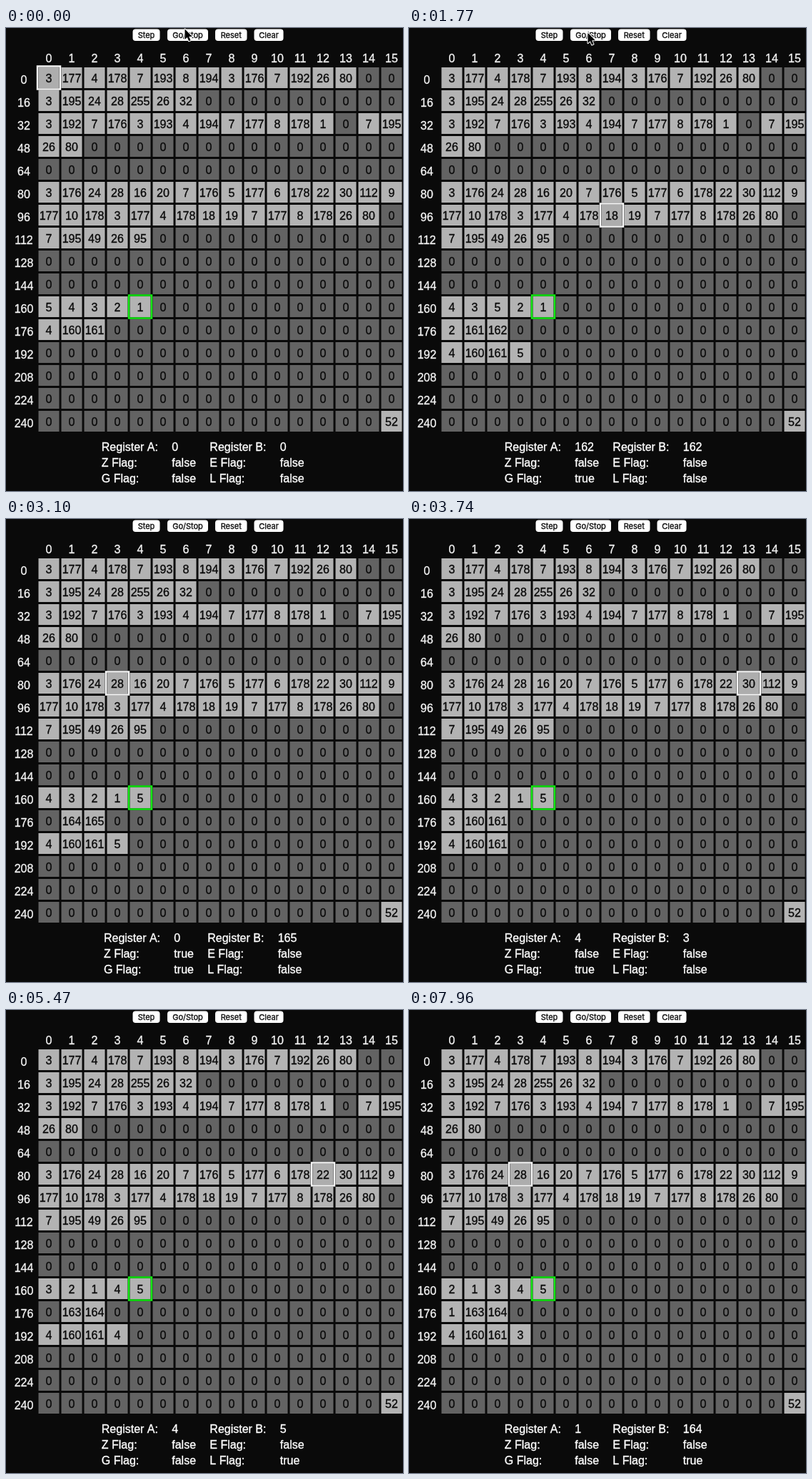
Animation of 556 by 647 pixels, one loop 8 s. Source, as an HTML page with a canvas:

```html
<!DOCTYPE html>
<html lang="en">
<head>
<meta charset="utf-8">
<title>Machine code sorter</title>
<style>
html, body { margin: 0; width: 100%; height: 100%; overflow: hidden; background: #0a0a0a; }
canvas { display: block; }
</style>
</head>
<body>
<canvas id="stage" width="556" height="647"></canvas>
<script>
const ctx = document.getElementById('stage').getContext('2d');
const LOOP = 8000, START = 495, TICK = 16.08;
const REFRESH = 57.83, FIRST = 440;
const SANS = '16px "Liberation Sans", Arial, sans-serif';
const CELL = 32, LEFT = 44, TOP = 53.5, SELECTED = 164;

// Instructions: opcode and effect; those taking a value are two bytes long
const OPS = {
  set: [1, (s, v) => { s.a = v; }],
  lda: [3, (s, v) => { s.a = s.mem[v]; }],
  ldb: [4, (s, v) => { s.b = s.mem[v]; }],
  geta: [5, (s, v) => { s.a = s.mem[s.mem[v]]; }],
  getb: [6, (s, v) => { s.b = s.mem[s.mem[v]]; }],
  sta: [7, (s, v) => { s.mem[v] = s.a; }],
  stb: [8, (s, v) => { s.mem[v] = s.b; }],
  puta: [9, (s, v) => { s.mem[s.mem[v]] = s.a; }],
  putb: [10, (s, v) => { s.mem[s.mem[v]] = s.b; }],
  inca: [18, s => { s.a++; }],
  incb: [19, s => { s.b++; }],
  dec: [20, s => { s.a--; }],
  cmp: [22, s => { s.e = s.a === s.b; s.g = s.a > s.b; s.l = s.a < s.b; }],
  test: [24, s => { s.z = s.a === 0; }],
  jmp: [26, (s, v) => { s.pc = v; }],
  jz: [28, (s, v) => { if (s.z) s.pc = v; }],
  jg: [30, (s, v) => { if (s.g) s.pc = v; }],
  swap: [49, s => { [s.a, s.b] = [s.b, s.a]; }],
  halt: [52, s => { s.pc = s.at; }]
};
const effects = Object.fromEntries(Object.values(OPS));

// Bubble sort in assembly, one named block per line
const BLOCKS = [
  ['init', 0, 'lda left ldb right sta left0 stb right0 lda count sta count0 jmp loop'],
  ['done', 16, 'lda swapped test jz end jmp reset'],
  ['reset', 32, 'lda count0 sta count lda left0 ldb right0 sta left stb right set 0 sta swapped jmp loop'],
  ['loop', 80, 'lda count test jz done dec sta count geta left getb right cmp jg trade'],
  ['next', 95, 'puta left putb right lda left ldb right inca incb sta left stb right jmp loop'],
  ['trade', 112, 'sta swapped swap jmp next'],
  ['list', 160, '5 4 3 2 1'],
  ['count', 176, '4 160 161'],
  ['end', 255, 'halt']
];
const names = { left: 177, right: 178, count0: 192, left0: 193, right0: 194, swapped: 195 };
for (const [name, addr] of BLOCKS) names[name] = addr;

function assemble() {
  const mem = new Array(256).fill(0);
  for (const [, addr, code] of BLOCKS) {
    code.split(' ').forEach((word, i) => {
      mem[addr + i] = OPS[word] ? OPS[word][0] : names[word] ?? +word;
    });
  }
  return mem;
}

// Each tick reads a single byte
function run(ticks) {
  const s = { mem: assemble(), a: 0, b: 0, pc: 0, at: 0, z: false, e: false, g: false, l: false };
  let pending = null;
  for (let i = 0; i < ticks; i++) {
    s.at = s.pc++;
    const byte = s.mem[s.at];
    if (pending) {
      pending(s, byte);
      pending = null;
    } else if (effects[byte].length === 2) {
      pending = effects[byte];
    } else {
      effects[byte](s);
    }
  }
  return s;
}

// The thin outline gives the text a slightly heavier weight
function text(str, x, y, color, align = 'left') {
  ctx.fillStyle = ctx.strokeStyle = color;
  ctx.textAlign = align;
  ctx.lineWidth = 0.35;
  ctx.fillText(str, x, y);
  ctx.strokeText(str, x, y);
}

function frameCell(addr, color) {
  ctx.strokeStyle = color;
  ctx.lineWidth = 2.5;
  ctx.strokeRect(LEFT + addr % 16 * CELL, TOP + (addr >> 4) * CELL, CELL, CELL);
}

function drawButtons() {
  ctx.font = '11px Inter, "Open Sans", sans-serif';
  const items = [['Step', 177.5, 38], ['Go/Stop', 226, 57], ['Reset', 293, 44.5], ['Clear', 347.5, 41]];
  for (const [label, x, w] of items) {
    ctx.fillStyle = '#fff';
    ctx.beginPath();
    ctx.roundRect(x, 1.5, w, 16.5, 4);
    ctx.fill();
    text(label, x + w / 2, 14, '#111', 'center');
  }
}

function drawGrid(s) {
  ctx.font = SANS;
  for (let i = 0; i < 16; i++) {
    text(i, 60 + i * CELL, 48, '#f4f4f4', 'center');
    text(i * 16, 25, 78 + i * CELL, '#f4f4f4', 'center');
  }
  s.mem.forEach((v, i) => {
    const x = LEFT + i % 16 * CELL, y = TOP + (i >> 4) * CELL;
    ctx.fillStyle = v ? (i === s.at ? '#adadad' : '#b3b3b3') : '#636363';
    ctx.fillRect(x + 1.5, y + 1.5, 29, 29);
    text(v, x + 16, y + 22.5, '#0a0a0a', 'center');
  });
  frameCell(SELECTED, '#14ea14');
  frameCell(s.at, '#f8f8f8');
}

// Centred table whose value columns fit their widest entry
function drawRegisters(s) {
  ctx.font = SANS;
  const cols = [
    ['Register A:', 'Z Flag:', 'G Flag:'], [s.a, s.z, s.g],
    ['Register B:', 'E Flag:', 'L Flag:'], [s.b, s.e, s.l]
  ];
  const widths = cols.map(c => Math.max(...c.map(v => ctx.measureText(v).width)));
  const gap = 19.3;
  let x = 275.7 - (widths.reduce((p, q) => p + q) + gap * 3) / 2;
  cols.forEach((col, c) => {
    col.forEach((v, r) => text(String(v), x, 590.5 + r * 22, '#fff'));
    x += widths[c] + gap;
  });
}

function drawCursor(x, y) {
  const pts = [[0, 0], [0, 14.5], [3.3, 11.4], [5.6, 16.8], [8, 15.8], [5.7, 10.5], [10.3, 10.5]];
  ctx.beginPath();
  pts.forEach(([px, py]) => ctx.lineTo(x + px, y + py));
  ctx.closePath();
  ctx.lineJoin = 'round';
  ctx.lineWidth = 2;
  ctx.strokeStyle = '#fff';
  ctx.stroke();
  ctx.fillStyle = '#000';
  ctx.fill();
  ctx.lineJoin = 'miter';
}

function draw(t) {
  const shown = FIRST + Math.floor((t - FIRST) / REFRESH) * REFRESH;
  const s = run(Math.max(0, Math.round((shown - START) / TICK)));
  ctx.fillStyle = '#0a0a0a';
  ctx.fillRect(0, 0, 556, 647);
  drawButtons();
  drawGrid(s);
  drawRegisters(s);
  if (t < 1940) drawCursor(250.5, t < 120 ? 1.5 : t < 210 ? 4.5 : 6.8);
}

const begin = performance.now();
function loop() {
  draw((performance.now() - begin + 3) % LOOP);
  requestAnimationFrame(loop);
}
loop();
</script>
</body>
</html>
```
